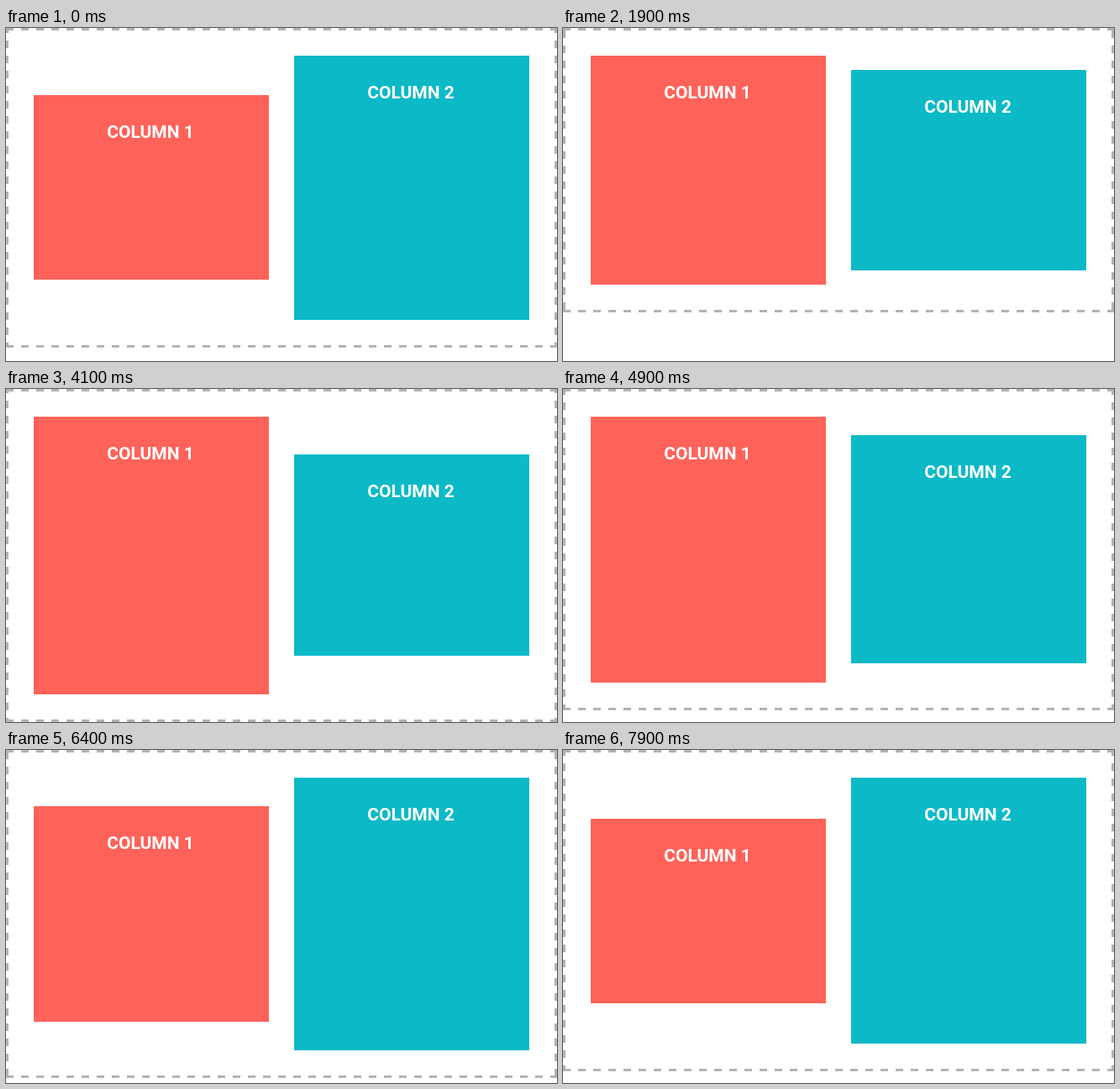
An HTML page that plays this animation: 656 by 397 pixels, repeating every 8000 ms.

```html
<!DOCTYPE html>
<html lang="en">
<head>
<meta charset="utf-8">
<title>Centered columns</title>
<style>
  html, body { margin: 0; width: 656px; height: 397px; overflow: hidden; background: #fff; }
  svg { display: block; }
  line { stroke: #b3b3b3; stroke-width: 3; }
  text { fill: #fff; font: 700 21px Roboto, "Open Sans", sans-serif; text-anchor: middle; }
</style>
</head>
<body>
<svg width="656" height="397">
  <g id="border"></g>
  <g id="columns">
    <g><rect x="33" width="280" fill="#ff6259"/><text x="172">COLUMN 1</text></g>
    <g><rect x="343" width="280" fill="#0bb9c7"/><text x="482">COLUMN 2</text></g>
  </g>
</svg>
<script>
const W = 656, EDGE = 3, DASH = 9, PAD = 33, LOOP = 8000, STEP = 100;
const PEAKS = [3982, 7000]; // time at which each column is tallest
const border = document.getElementById("border");
const columns = [...document.getElementById("columns").children];

const setAll = (el, attrs) => {
  for (const k in attrs) el.setAttribute(k, attrs[k]);
};

// Dash offset that balances the pattern along a side of the given length
function dashOffset(length) {
  const rest = length % DASH;
  const even = Math.floor(length / DASH) % 2 === 0;
  if (!rest) return even ? Math.floor(DASH / 2) : 0;
  return even ? Math.floor((DASH - rest) / 2) : DASH - rest + Math.floor(rest / 2);
}

// One dashed side between two solid corner squares
function side(x, y, length, vertical) {
  const point = d => vertical ? [x, y + d] : [x + d, y];
  const line = (from, to, dash = "") => {
    const [x1, y1] = point(from), [x2, y2] = point(to);
    return `<line x1="${x1}" y1="${y1}" x2="${x2}" y2="${y2}" ${dash}/>`;
  };
  const end = length - EDGE;
  const dash = `stroke-dasharray="${DASH}" stroke-dashoffset="${dashOffset(end - EDGE)}"`;
  return line(0, EDGE) + line(EDGE, end, dash) + line(end, length);
}

function draw(time) {
  const step = Math.floor(time % LOOP / STEP);
  const t = step && step * STEP + 20;
  const heights = PEAKS.map(p => 275.5 + 55.5 * Math.cos((t - p) / LOOP * 2 * Math.PI));
  const tallest = Math.max(...heights);

  columns.forEach((col, i) => {
    const y = PAD + (tallest - heights[i]) / 2;
    const top = Math.round(y), bottom = Math.round(y + heights[i]);
    setAll(col.firstChild, { y: top, height: bottom - top });
    setAll(col.lastChild, { y: top + 51 });
  });

  const H = Math.round(tallest) + 2 * PAD, half = EDGE / 2;
  border.innerHTML = side(0, half, W) + side(0, H - half, W) +
    side(half, 0, H, true) + side(W - half, 0, H, true);
}

const start = performance.now();
function tick() {
  draw(performance.now() - start);
  requestAnimationFrame(tick);
}
tick();
</script>
</body>
</html>
```
